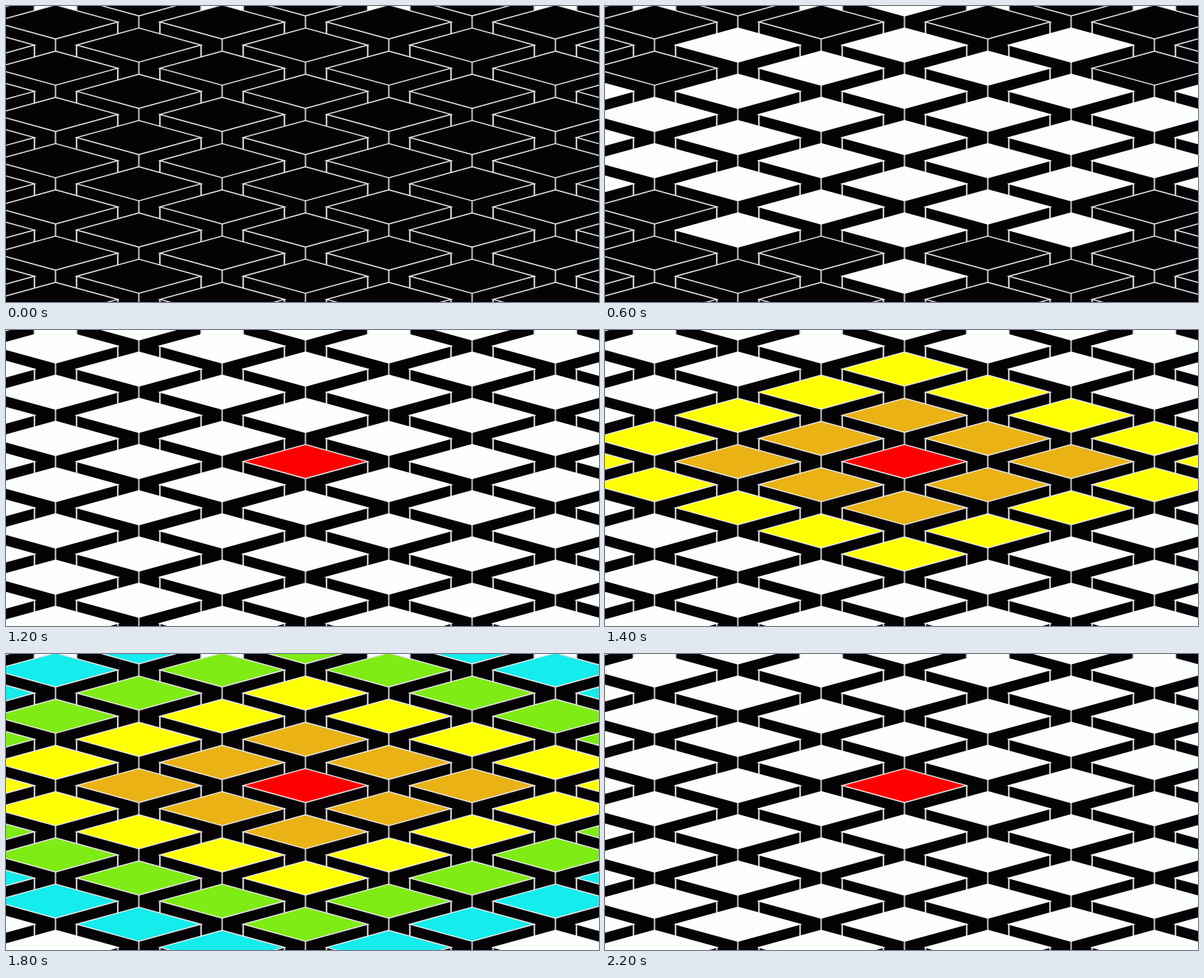
Animation, 1000 px wide and 500 px high, one loop 2300 ms. Source, as an HTML page with a canvas:

```html
<!DOCTYPE html>
<html lang="en">
<head>
<meta charset="utf-8">
<title>Tile wave</title>
<style>
  html, body { margin: 0; width: 100%; height: 100%; overflow: hidden; background: #fdfffc; }
  canvas { display: block; width: 1000px; height: 500px; }
</style>
</head>
<body>
<canvas id="stage" width="1000" height="500"></canvas>
<script>
const ctx = document.getElementById('stage').getContext('2d');

const STEP = 100, STEPS = 23;
const HALF_W = 105, HALF_H = 28.8, DEPTH = 45;
const BLACK = '#040205', WHITE = '#fdfffc', EDGE = '#e4e4e2';
const RING_COLORS = ['#ff0000', '#eab215', '#ffff05', '#7fec15', '#15ecec', '#1537eb'];
const RED_STEP = 12, PEAK_STEP = 17;

// Tiles in painting order, back to front; odd columns sit half a row lower.
const tiles = [];
for (let row = -3; row <= 3; row++) {
  for (const odd of [0, 1]) {
    for (let col = -4 + odd; col <= 4; col += 2) {
      const dy = row + odd / 2;
      const ring = Math.abs(col) / 2 + Math.abs(dy);
      tiles.push({
        x: 505 + 140.5 * col,
        y: 222.2 + 78.1 * dy,
        ring,
        whiteStep: ring ? 2 * ring + odd : 1
      });
    }
  }
}

function topColor(tile, step) {
  // The coloured rings spread outwards to the peak, then withdraw.
  const reach = step < RED_STEP ? -1 : PEAK_STEP - RED_STEP - Math.abs(step - PEAK_STEP);
  if (tile.ring <= reach) return RING_COLORS[tile.ring];
  return step >= tile.whiteStep ? WHITE : BLACK;
}

function polygon(points) {
  ctx.beginPath();
  points.forEach(([x, y]) => ctx.lineTo(x, y));
  ctx.closePath();
}

function vertical(x, y, width, color) {
  ctx.fillStyle = color;
  ctx.fillRect(x - width / 2, y, width, DEPTH);
}

function drawTile({ x, y }, color) {
  const left = x - HALF_W, right = x + HALF_W, bottom = y + HALF_H;
  polygon([[left, y], [right, y], [right, y + DEPTH], [x, bottom + DEPTH], [left, y + DEPTH]]);
  ctx.fillStyle = BLACK;
  ctx.fill();

  vertical(left, y, 2.6, '#d8d8d8');
  vertical(right, y, 2.6, '#d8d8d8');
  vertical(x, bottom, 2.8, '#b0b0b0');

  polygon([[left, y], [x, y - HALF_H], [right, y], [x, bottom]]);
  ctx.fillStyle = color;
  ctx.fill();
  ctx.strokeStyle = color === WHITE ? WHITE : EDGE;
  ctx.lineWidth = 1.9;
  ctx.stroke();
}

function draw(step) {
  ctx.fillStyle = WHITE;
  ctx.fillRect(0, 0, 1000, 500);
  for (const tile of tiles) drawTile(tile, topColor(tile, step));
}

const start = performance.now();
let shown = -1;
function tick() {
  const step = Math.floor((performance.now() - start) / STEP) % STEPS;
  if (step !== shown) draw(shown = step);
  requestAnimationFrame(tick);
}
tick();
</script>
</body>
</html>
```
